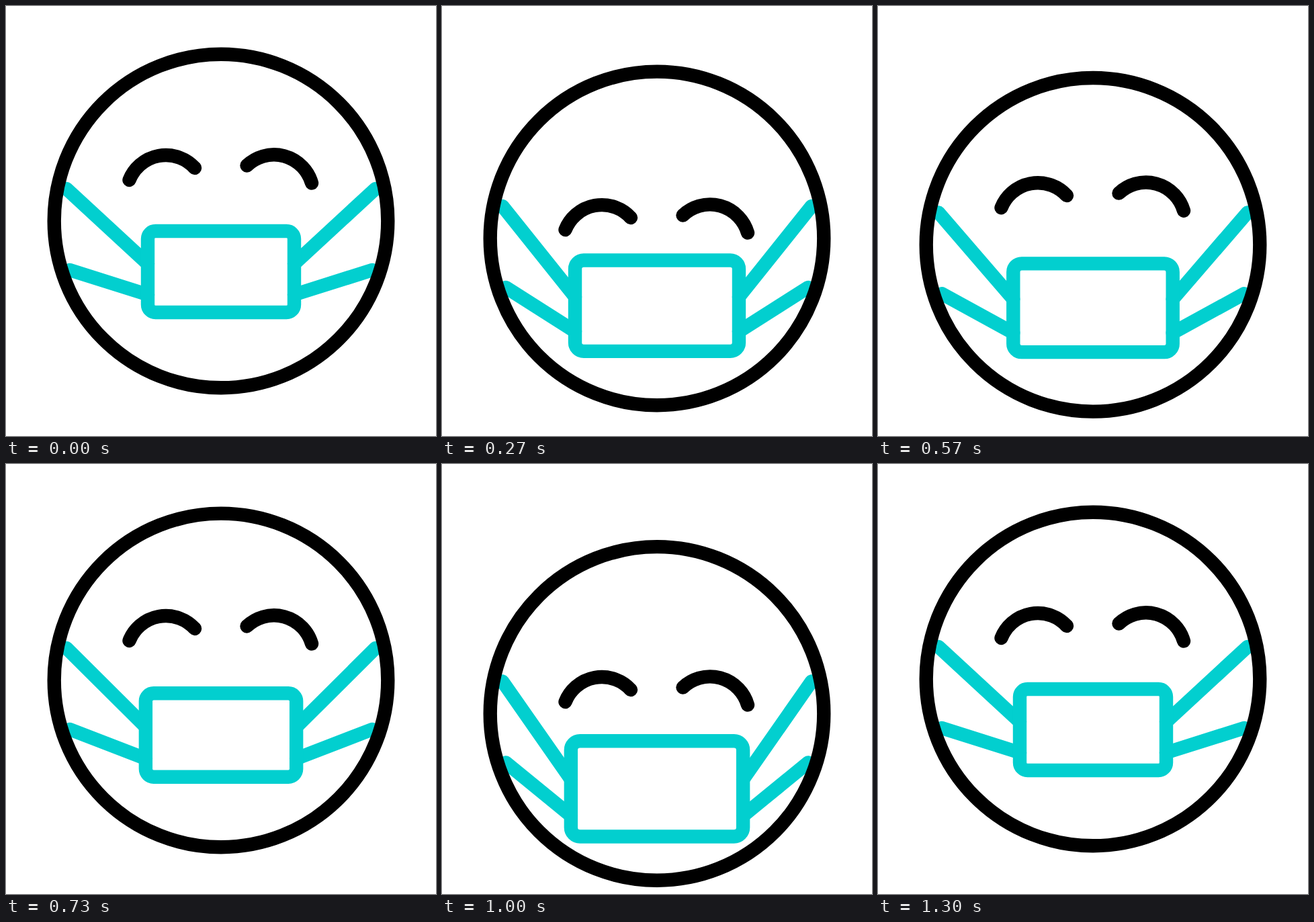
An HTML page for the animation above (1.67 s loop, 640 px wide and 640 px high).

```html
<!DOCTYPE html>
<html lang="en">
<head>
<meta charset="utf-8">
<title>Masked face</title>
<style>
  html, body { margin: 0; width: 100%; height: 100%; overflow: hidden; background: #fff; }
  svg { display: block; width: 100%; height: 100%; }
  svg * { fill: none; stroke-width: 20.4; stroke-linecap: round; }
  .teal { stroke: #02cfcf; }
  .ink { stroke: #000; }
</style>
</head>
<body>
<svg viewBox="0 0 640 640">
  <path id="straps" class="teal"/>
  <rect id="mask" class="teal"/>
  <circle id="head" class="ink" cx="320" r="248.3"/>
  <path id="eyes" class="ink" d="M183.5 259A58.5 58.5 0 0 1 281 241M358.5 237.5A58.5 58.5 0 0 1 455 263.5"/>
</svg>
<script>
const LOOP = 1670, STEP = 100 / 3;
const [straps, mask, head, eyes] = ['straps', 'mask', 'head', 'eyes'].map(id => document.getElementById(id));

// Each track is a list of [step, value] keys, eased between neighbours.
const tracks = {
  head: [[2.5, 0], [13.44, 51.5], [22.89, 0.7], [29.86, 51.5], [38.82, 0]],
  eyes: [[1, 0], [11.5, 100], [11.8, 100], [21.1, 0], [28.6, 100], [39, 0]],
  mask: [[1, 0], [12.63, 1], [14.2, 1], [19.7, 0], [28.87, 1], [38.1, 0]]
};

function valueAt(keys, n) {
  const i = keys.findIndex(k => k[0] > n);
  if (i < 0) return keys[keys.length - 1][1];
  if (i === 0) return keys[0][1];
  const [t0, a] = keys[i - 1], [t1, b] = keys[i];
  const s = (n - t0) / (t1 - t0);
  return a + (b - a) * s * s * (3 - 2 * s);
}

function setAttrs(el, attrs) {
  for (const name in attrs) el.setAttribute(name, attrs[name]);
}

function draw(ms) {
  const n = Math.floor((ms % LOOP + 5) / STEP);
  const dy = valueAt(tracks.head, n);
  const p = valueAt(tracks.mask, n);

  const scale = 1 + 0.183 * p;
  const w = 218 * scale, h = 121 * scale;
  const x = 320 - w / 2, y = 395.5 + dy + 38 * p - h / 2;

  const strap = (outX, outY, part) => {
    const y0 = outY + dy, y1 = y + h * part;
    return `M${outX} ${y0}L${x} ${y1}M${640 - outX} ${y0}L${640 - x} ${y1}`;
  };

  setAttrs(head, { cy: 320 + dy });
  setAttrs(eyes, { transform: `translate(0 ${valueAt(tracks.eyes, n)})` });
  setAttrs(mask, { x, y, width: w, height: h, rx: 11.5 * scale });
  setAttrs(straps, { d: strap(90, 272, 0.402) + strap(95, 393, 0.782) });
}

const start = performance.now();
function tick() {
  draw(performance.now() - start);
  requestAnimationFrame(tick);
}
tick();
</script>
</body>
</html>
```
